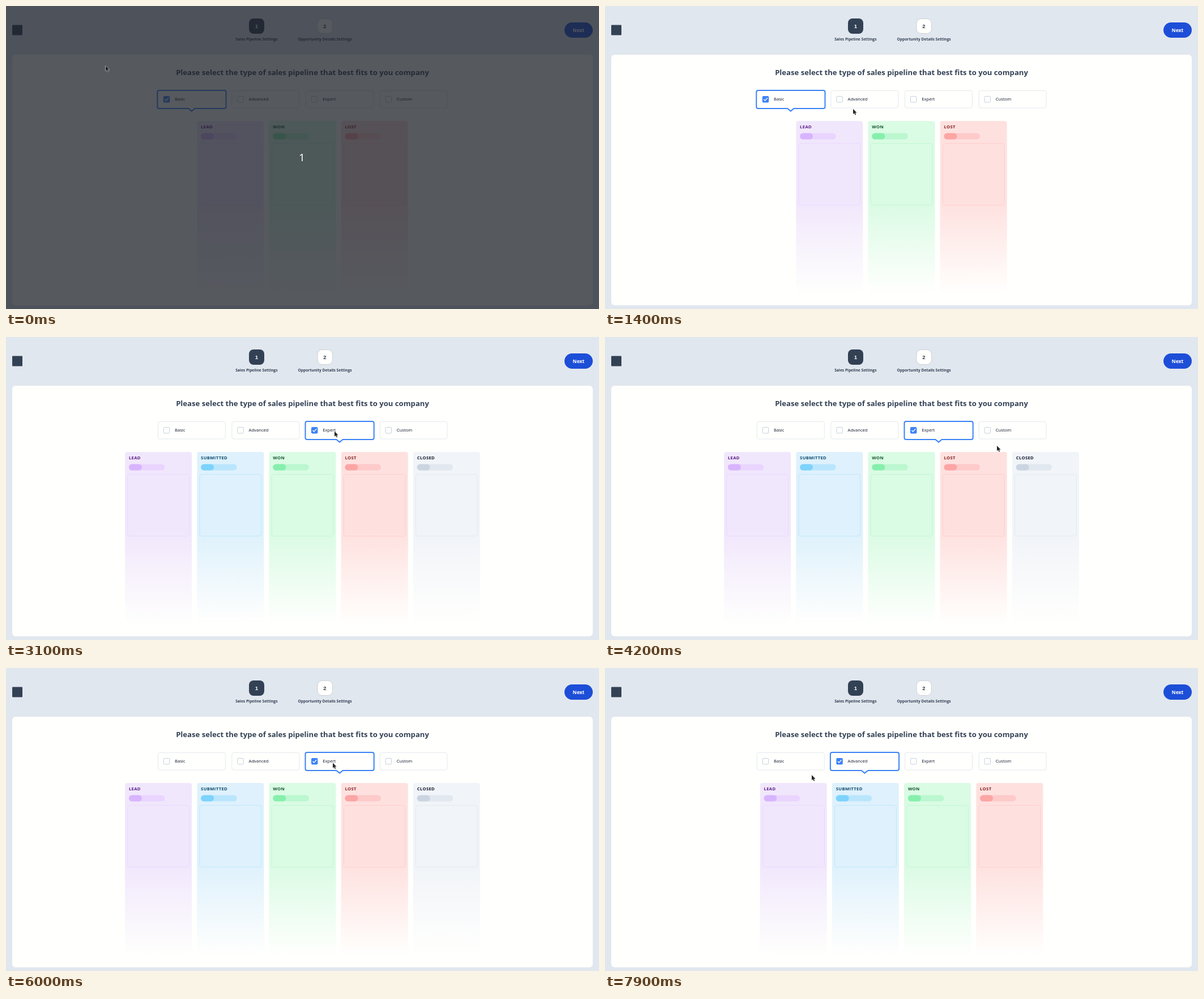
Write an HTML page that moves like this. It is 1047x535 px and loops after 8000 ms.

```html
<!DOCTYPE html>
<html lang="en">
<head>
<meta charset="utf-8">
<title>Pipeline settings</title>
<style>
  html, body { margin: 0; width: 100%; height: 100%; overflow: hidden; background: #e1e7ee; }
  svg { display: block; width: 1047px; height: 535px; }
  text { font-family: "Open Sans", "Noto Sans", sans-serif; fill: #334155; }
  .bold { font-weight: 700; }
  .mid { text-anchor: middle; }
  .title { font-size: 13.12px; }
  .step { font: 700 9.6px "Liberation Sans", sans-serif; }
  .caption { font-size: 6.7px; }
  .next { font-size: 8.7px; fill: #fff; }
  .option { font-size: 7.65px; fill: #0f172a; }
  .stage { font-size: 7.7px; letter-spacing: .33px; }
  .count { font: 18px "Noto Sans", sans-serif; fill: #fff; }

  .scene, .intro { visibility: hidden; animation: 8s step-end infinite; }
  .basic { animation-name: basic; }
  .advanced { animation-name: advanced; }
  .expert { animation-name: expert; }
  .custom { animation-name: custom; }
  .intro { animation-name: intro; }
  @keyframes intro { 0% { visibility: visible } 1.25%, 100% { visibility: hidden } }
  @keyframes basic { 0% { visibility: visible } 21.25%, 100% { visibility: hidden } }
  @keyframes advanced {
    0%, 38.75% { visibility: hidden }
    21.25%, 91.25%, 100% { visibility: visible }
  }
  @keyframes expert {
    0%, 57.5%, 91.25%, 100% { visibility: hidden }
    38.75%, 75% { visibility: visible }
  }
  @keyframes custom {
    0%, 75%, 100% { visibility: hidden }
    57.5% { visibility: visible }
  }

  /* The pointer advances once every 100 ms (1.25%). */
  .pointer { animation: pointer 8s step-end infinite; }
  @keyframes pointer {
    0% { transform: translate(176px, 105.5px) }
    5% { transform: translate(176px, 105.5px); animation-timing-function: steps(3) }
    8.75% { transform: translate(236px, 140px); animation-timing-function: steps(3) }
    12.5% { transform: translate(350px, 187px); animation-timing-function: steps(2) }
    15% { transform: translate(415px, 195px); animation-timing-function: steps(1) }
    16.25% { transform: translate(434px, 188px); animation-timing-function: steps(3) }
    20% { transform: translate(446px, 169px) }
    23.75% { transform: translate(446px, 169px); animation-timing-function: steps(3) }
    27.5% { transform: translate(461px, 194px); animation-timing-function: steps(3) }
    31.25% { transform: translate(511px, 212px); animation-timing-function: steps(2) }
    33.75% { transform: translate(560px, 195px); animation-timing-function: steps(1) }
    35% { transform: translate(577px, 179px); animation-timing-function: steps(2) }
    37.5% { transform: translate(580px, 166.5px) }
    38.75% { transform: translate(580px, 166.5px); animation-timing-function: steps(3) }
    42.5% { transform: translate(588px, 181px); animation-timing-function: steps(4) }
    47.5% { transform: translate(634px, 204px); animation-timing-function: steps(4) }
    52.5% { transform: translate(692px, 192px); animation-timing-function: steps(3) }
    56.25% { transform: translate(709px, 166px) }
    58.75% { transform: translate(709px, 166px); animation-timing-function: steps(3) }
    62.5% { transform: translate(695px, 190px); animation-timing-function: steps(3) }
    66.25% { transform: translate(639px, 203px); animation-timing-function: steps(3) }
    70% { transform: translate(586px, 183px); animation-timing-function: steps(3) }
    73.75% { transform: translate(577px, 167.5px) }
    76.25% { transform: translate(577px, 167.5px); animation-timing-function: steps(3) }
    80% { transform: translate(557px, 185px); animation-timing-function: steps(3) }
    83.75% { transform: translate(495px, 189px); animation-timing-function: steps(3) }
    87.5% { transform: translate(436px, 167px); animation-timing-function: steps(1) }
    88.75% { transform: translate(436px, 165.5px) }
    93.75% { transform: translate(436px, 165.5px); animation-timing-function: steps(4) }
    98.75%, 100% { transform: translate(365px, 189px) }
  }
</style>
</head>
<body>
<svg viewBox="0 0 1047 535">
  <defs>
    <linearGradient id="fade" x1="0" y1="0" x2="0" y2="1">
      <stop offset="0" stop-color="#fffffd" stop-opacity="0"/>
      <stop offset="1" stop-color="#fffffd"/>
    </linearGradient>
  </defs>

  <rect width="1047" height="535" fill="#e1e7ee"/>
  <rect x="11" y="33.5" width="18" height="18" rx="1" fill="#334155"/>
  <rect x="429" y="22" width="27" height="27" rx="8" fill="#334155"/>
  <text class="step mid" x="442.3" y="38.8" style="fill:#fff">1</text>
  <rect x="550" y="22.5" width="26.5" height="26" rx="8" fill="#fffffd" stroke="#cbd0d6"/>
  <text class="step mid" x="563" y="38.8">2</text>
  <text class="caption bold mid" x="442.3" y="60.6">Sales Pipeline Settings</text>
  <text class="caption bold mid" x="563" y="60.6">Opportunity Details Settings</text>
  <rect x="986" y="29" width="50" height="27" rx="13.5" fill="#1d4ed8"/>
  <text class="next bold mid" x="1011" y="45.7">Next</text>
  <rect x="11" y="86" width="1025" height="442.5" rx="6" fill="#fffffd"/>
  <text class="title bold mid" x="523.5" y="122">Please select the type of sales pipeline that best fits to you company</text>

  <g id="scenes"></g>

  <g class="intro">
    <rect width="1047" height="535" fill="#1e222a" fill-opacity=".75"/>
    <text class="count mid" x="522.5" y="274">1</text>
  </g>

  <path class="pointer" d="M0 0V9.2L2.1 7.3 3.7 10.7 5.2 10 3.7 6.8H6.6Z"
        fill="#222" stroke="#fff" stroke-width="1" stroke-linejoin="round" paint-order="stroke"/>
</svg>

<script>
  // background, bar, bar fill, label
  const stages = {
    'LEAD': ['#f1e7fc', '#e9d5ff', '#d8b4fe', '#581c87'],
    'RDP IN PROGRESS': ['#feecd2', '#fed7aa', '#fdba74', '#7c2d12'],
    'SUBMITTED': ['#def1fc', '#bae6fd', '#7dd3fc', '#0c4a6e'],
    'WON': ['#dafbe4', '#bbf7d0', '#86efac', '#14532d'],
    'LOST': ['#fee1df', '#fecaca', '#fca5a5', '#7f1d1d'],
    'CLOSED': ['#f1f4f8', '#e2e8f0', '#cbd5e1', '#0f172a']
  };
  const plans = {
    Basic: ['LEAD', 'WON', 'LOST'],
    Advanced: ['LEAD', 'SUBMITTED', 'WON', 'LOST'],
    Expert: ['LEAD', 'SUBMITTED', 'WON', 'LOST', 'CLOSED'],
    Custom: Object.keys(stages)
  };
  const names = Object.keys(plans);
  const pitch = 127.2, gap = 9.2, width = pitch - gap;

  function option(name, i, active) {
    const frame = active
      ? `<path d="M2.5 149H117.3q3.2 0 3.2 3.2V177.8q0 3.2-3.2 3.2H65.4L59.8 185.6 54.2 181H2.5q-3.2 0-3.2-3.2V152.2q0-3.2 3.2-3.2Z"
           fill="#fffffd" stroke="#3b82f6" stroke-width="2"/>`
      : `<rect x=".3" y="149.5" width="119" height="30.5" rx="3" fill="#fffffd" stroke="#e5e9ef"/>`;
    const box = active
      ? `<rect x="9.8" y="159" width="11.4" height="11.4" rx="2" fill="#3b82f6"/>
         <path d="M12.3 164.8l2.3 2.3 4.3-4.8" fill="none" stroke="#fff" stroke-width="1.4"/>`
      : `<rect x="10.3" y="159.5" width="10.4" height="10.4" rx="1.5" fill="#fffffd" stroke="#c3d0df"/>`;
    return `<g transform="translate(${268 + 130.6 * i})">${frame}${box}
      <text class="option" x="30" y="167.4">${name}</text></g>`;
  }

  function column(name, i, total) {
    const [back, bar, fill, ink] = stages[name];
    const x = 523.5 - (total * pitch - gap) / 2 + i * pitch;
    return `<g transform="translate(${x})">
      <rect y="203" width="${width}" height="302" rx="4" fill="${back}"/>
      <text class="stage bold" x="6.8" y="216.3" style="fill:${ink}">${name}</text>
      <rect x="6.8" y="224.5" width="63.5" height="11" rx="5.5" fill="${bar}"/>
      <rect x="6.8" y="224.5" width="23" height="11" rx="5.5" fill="${fill}"/>
      <rect x="4.5" y="242.5" width="109" height="109" rx="4" fill="none" stroke="${bar}" stroke-opacity=".8"/>
      <rect x="-.5" y="346" width="${width + 1}" height="160" fill="url(#fade)"/></g>`;
  }

  document.getElementById('scenes').innerHTML = names.map(plan =>
    `<g class="scene ${plan.toLowerCase()}">
      ${names.map((name, i) => option(name, i, name === plan)).join('')}
      ${plans[plan].map((name, i, all) => column(name, i, all.length)).join('')}
    </g>`).join('');
</script>
</body>
</html>
```
